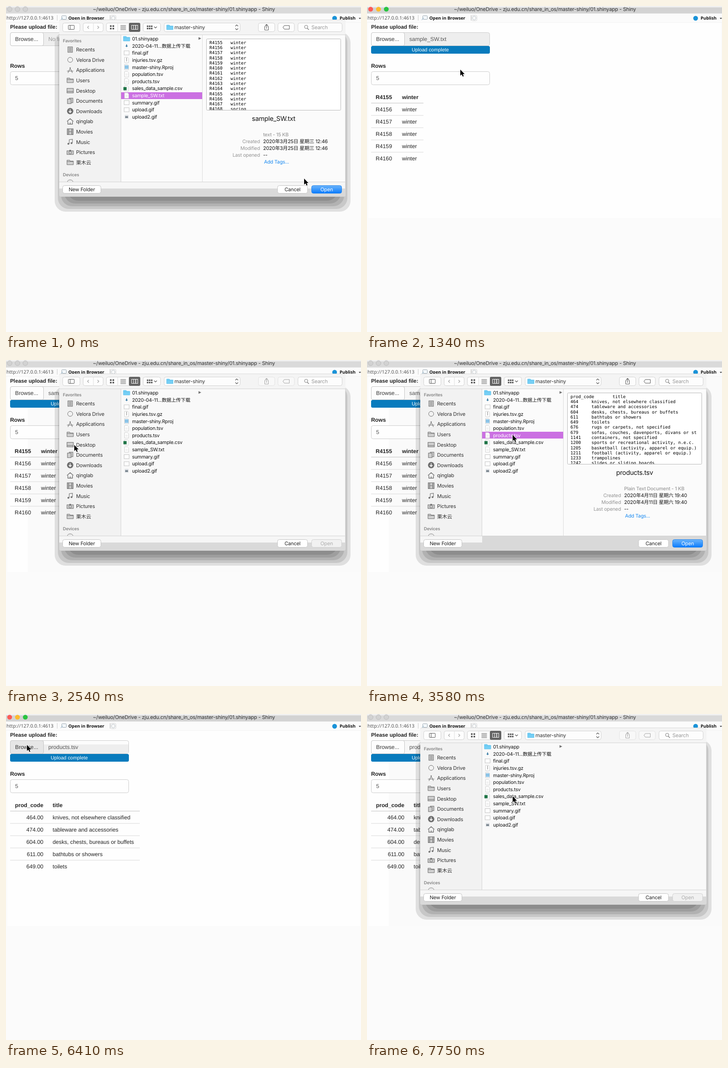
Animation, 780 px wide and 718 px high, one loop 8 s. Source, as an HTML page:

```html
<!DOCTYPE html>
<html lang="en">
<head>
<meta charset="utf-8">
<title>File upload</title>
<style>
html, body { margin: 0; width: 100%; height: 100%; overflow: hidden; background: #fbfbfb; }
svg { display: block; width: 780px; height: 718px; }
text { white-space: pre; text-rendering: geometricPrecision; }
.ui { font-family: Inter, "Noto Sans CJK SC", "Noto Sans CJK", sans-serif; letter-spacing: -.018em; }
.pg { font-family: "Liberation Sans", sans-serif; }
.tb { font-family: "Noto Sans", sans-serif; }
.mono { font-family: "DejaVu Sans Mono", monospace; }
.b { font-weight: 700; }
.sb { font-weight: 600; }
.md { font-weight: 500; }
.mid { text-anchor: middle; }
.end { text-anchor: end; }
</style>
</head>
<body>
<svg id="stage" viewBox="0 0 780 718"></svg>
<script>
const LOOP = 8000, TICK = 149;

const CLOSE_1 = 5, FILE_1 = 6, TABLE_1 = 7, HOVER_1 = 12, OPEN_2 = 16, PICK_2 = 24,
  CLOSE_2 = 33, FILE_2 = 34, TABLE_2 = 36, HOVER_2 = 41, OPEN_3 = 44;

// Pointer key points: tick, x, y
const route = [[0, 655, 380], [2, 690, 404], [6, 690, 404], [9, 205, 140], [12, 46, 69], [15, 46, 69],
  [17, 150, 187], [21, 320, 165], [25, 320, 165], [30, 690, 410], [33, 690, 404], [35, 690, 404],
  [41, 46, 68], [43, 46, 68], [45, 150, 160], [49, 326, 172], [52, 320, 181], [54, 320, 181]];

const places = ['Recents', 'Velora Drive', 'Applications', 'Users', 'Desktop', 'Documents', 'Downloads',
  'qinglab', 'Movies', 'Music', 'Pictures', '栗木云'];
const files = ['01.shinyapp', '2020-04-11...数据上传下载', 'final.gif', 'injuries.tsv.gz', 'master-shiny.Rproj',
  'population.tsv', 'products.tsv', 'sales_data_sample.csv', 'sample_SW.txt', 'summary.gif', 'upload.gif', 'upload2.gif'];
const products = `464 knives, not elsewhere classified
474 tableware and accessories
604 desks, chests, bureaus or buffets
611 bathtubs or showers
649 toilets
676 rugs or carpets, not specified
679 sofas, couches, davenports, divans or st
1141 containers, not specified
1200 sports or recreational activity, n.e.c.
1205 basketball (activity, apparel or equip.)
1211 football (activity, apparel or equip.)
1233 trampolines
1242 slides or sliding boards`.split('\n').map(line => line.split(/ (.*)/));
const samples = Array.from({ length: 14 }, (_, i) => ['R' + (4155 + i), i < 13 ? 'winter' : 'spring']);

const repeat = (n, fn) => Array.from({ length: n }, (_, i) => fn(i)).join('');
// y is the middle of the capitals
const text = (x, y, size, cls, str, fill = '#222') =>
  `<text x="${x}" y="${y + size * .36}" font-size="${size}" class="${cls}" fill="${fill}">${str}</text>`;
const rect = (x, y, w, h, fill, rest = '') =>
  `<rect x="${x}" y="${y}" width="${w}" height="${h}" fill="${fill}" ${rest}/>`;
const box = (x, y, w, h, r, fill, stroke) =>
  rect(x + .5, y + .5, w - 1, h - 1, fill, `rx="${r}" stroke="${stroke}"`);
const path = (d, stroke, fill = 'none', w = 1, rest = '') =>
  `<path d="${d}" stroke="${stroke}" fill="${fill}" stroke-width="${w}" ${rest}/>`;
const dot = (x, y, r, fill, stroke = 'none') =>
  `<circle cx="${x}" cy="${y}" r="${r}" fill="${fill}" stroke="${stroke}"/>`;
const at = (x, y, s) => `<g transform="translate(${x} ${y})">${s}</g>`;
const folder = (fill, stroke) => path('M-7-5H-1L0-3H7V5H-7ZM-7-2H7', stroke, fill);
const blueFolder = folder('#76cff5', '#5fc3ee');

function chrome(active) {
  const lights = active ? ['#fc5b57', '#fdbc2e', '#29c440'] : Array(3).fill('#d2d2d2');
  return rect(0, 0, 780, 4, '#f0f0f0') + rect(0, 3, 780, 13.5, active ? '#d3d3d3' : '#dadada') +
    lights.map((c, i) => dot(8 + 17.2 * i, 7, 5.3, c, active ? 'none' : '#bdbdbd')).join('') +
    text(391, 7.3, 11.3, 'ui mid', '~/weiluo/OneDrive - zju.edu.cn/share_in_os/master-shiny/01.shinyapp - Shiny', '#333') +
    text(1, 26.5, 10.6, 'tb', 'http://127.0.0.1:4613', '#555') +
    path('M112.5 20V32M228.5 20V32', '#ccc') +
    box(122, 21, 11, 9, 1, '#f4f8fb', '#9aa7b0') + path('M120 31L125 26', '#7fa8c4') +
    text(137, 26.5, 9.55, 'tb sb', 'Open in Browser', '#111') +
    box(229, 20, 13, 13, 3, '#fafafa', '#d5d5d5') + dot(235.5, 26.5, 4, 'none', '#b5bec4') +
    dot(722, 27, 5.2, '#1a93d8') + text(733, 27, 9.5, 'tb sb', 'Publish', '#111') +
    path('M775 26H780L777.5 29Z', 'none', '#444') + rect(0, 36, 780, 1, '#f3f3f3');
}

function table(heads, rows, cols, width, numeric) {
  const row = (cells, y, cls) => cells.map((c, i) =>
    text(cols[i], y, 12.2, cls + (numeric && !i ? ' end' : ''), c)).join('');
  return row(heads, 200.5, 'pg b') + rect(9, 213, width, 1.5, '#d4d4d4') +
    rows.map((r, i) => row(r, 228 + 27 * i, 'pg')).join('') +
    repeat(4, i => rect(9, 240.5 + 27 * i, width, 1, '#d9d9d9'));
}

function page(n, open) {
  const file = n < FILE_1 ? '' : n < FILE_2 ? 'sample_SW.txt' : 'products.tsv';
  const hover = !open && (n >= HOVER_1 && n < OPEN_2 || n >= HOVER_2);
  const field = n < OPEN_2 ? '#eee' : open ? '#f7f7f7' : '#fcfcfc';
  let s = '';
  if (n >= CLOSE_1) s += rect(3, 37, 775, 430, '#fefefe') + (open ? rect(48, 37, 732, 430, '#fafafa') : '');
  s += text(9, 45.5, 11.8, 'pg b', 'Please upload file:') + box(9, 58, 261, 30, 4, field, '#ccc');
  if (n >= FILE_2 && !open) s += rect(83, 67, 186, 20, '#eee');
  s += box(9, 58, 74, 30, 3.5, hover ? '#e6e6e6' : '#fdfdfd', '#c4c4c4') +
    text(20, 73, 12.2, 'pg', 'Browse...', '#333') +
    text(93, 73, 12.2, 'pg', file || 'No file selected', file ? '#555' : '#999');
  if (file) s += rect(9, 88, 261, 17, '#087bbd', 'rx="3.5"') + text(139, 96.5, 10.9, 'pg mid', 'Upload complete', '#fff');
  s += text(9, 131.5, 12.2, 'pg b', 'Rows') + box(9, 144, 261, 30, 4, '#fefefe', '#ccc') + text(20, 159, 12.2, 'pg', '5', '#555');
  if (n >= TABLE_2) s += table(['prod_code', 'title'], products.slice(0, 5).map(([code, title]) => [code + '.00', title]), [82, 102.5], 285, true);
  else if (n >= TABLE_1) s += table(samples[0], samples.slice(1, 6), [19, 77], 115);
  return s;
}

function toolbar(enabled) {
  const ink = '#555';
  const button = (x, w, icon) => box(x, 37, w, 20, 4, '#fdfdfd', '#d2d2d2') + at(x + w / 2, 47, icon);
  const chevron = (x, y, turn) => `<path transform="translate(${x} ${y}) rotate(${turn})" d="M-3 1.5L0-1.5 3 1.5" stroke="${ink}" fill="none" stroke-width="1.2"/>`;
  return button(124, 39, box(-7, -5, 14, 10, 1, 'none', ink) + path('M-2.5-5V5', ink)) +
    button(169, 45, `<g opacity=".55">${chevron(-11, 0, -90) + chevron(11, 0, 90)}</g>` + path('M.5-10V10', '#ddd')) +
    button(220, 75, repeat(4, i => rect(-29 + i % 2 * 5.5, -4.5 + (i >> 1) * 5.5, 3.5, 3.5, ink)) +
      repeat(4, i => rect(-6, -4.5 + 3 * i, 12, 1, ink)) + path('M-12-10V10', '#ddd') +
      rect(12.5, -10, 25, 20, '#636363', 'rx="3"') + repeat(3, i => rect(18.5 + 4.5 * i, -4.5, 4.5, 9, 'none', 'stroke="#fff"'))) +
    button(301, 39, repeat(6, i => rect(-11 + i % 3 * 4.5, -4 + (i > 2) * 5, 3.3, 3.3, ink)) + chevron(8, 0, 180)) +
    button(347, 168, chevron(76, -4, 0) + chevron(76, 4, 180)) +
    at(360, 47, blueFolder) + text(370, 47.2, 11.3, 'ui', 'master-shiny', '#333') +
    `<g opacity="${enabled ? 1 : .5}">` +
    button(554, 37, path('M-2-2H-4V6H4V-2H2M0 3V-6', ink) + chevron(0, -5, 0)) +
    button(597, 37, path('M-7 0L-4-4H7V4H-4Z', ink)) + '</g>' +
    button(641, 98, '') + dot(659.5, 46, 3.6, 'none', '#777') + path('M662 49L665.5 52.5', '#777', 'none', 1.3) +
    text(671, 47.3, 11.2, 'ui', 'Search', '#999');
}

function placeIcon(name) {
  const ink = '#6f6f6f', pale = '#cfcfcf';
  const line = (d, w = 1.1) => path(d, ink, 'none', w);
  const plate = (w, h) => rect(-w / 2, -h / 2, w, h, pale, `stroke="${ink}" stroke-width="1.1"`);
  const icons = {
    Recents: () => plate(10, 12) + repeat(3, i => rect(-3, -3.5 + 3 * i, 6, 1, ink)),
    'Velora Drive': () => dot(0, 0, 5.5, 'none', ink),
    Applications: () => line('M-5 6L1-6M-1-6L5 6M-7 2H7'),
    Desktop: () => plate(14, 10) + line('M-7 2H7'),
    Documents: () => at(2, -1, plate(8, 10)) + at(-2, 1, plate(8, 10)),
    Downloads: () => dot(0, 0, 7, ink) + path('M0-4V3M-3 0L0 3 3 0', '#fff', 'none', 1.5),
    qinglab: () => line('M-7 0L0-6 7 0M-5 0V6H5V0M0 6V2', 1.4),
    Movies: () => plate(13, 13) + line('M-3-6V6M3-6V6M-3 0H3') + repeat(4, i => rect(-6, -4.5 + 3 * i, 3, 1, ink) + rect(3, -4.5 + 3 * i, 3, 1, ink)),
    Music: () => line('M-2 4V-5L5-6V2') + dot(-4, 4, 2, ink) + dot(3, 2.5, 2, ink),
    Pictures: () => at(0, 1, plate(14, 8) + dot(0, 0, 3, 'none', ink)) + rect(-2, -5, 4, 2, ink)
  };
  return icons[name] ? icons[name]() : folder(pale, ink);
}

function fileIcon(name) {
  const sheet = path('M-4.5-6H2L4.5-3.5V6H-4.5Z', '#d0d0d0', '#fff');
  const type = name.split('.').pop();
  if (type === 'shinyapp') return blueFolder;
  if (name.startsWith('2020')) return path('M-1-3H1V0H3L0 3-3 0H-1Z', 'none', '#3a7ca5');
  if (name === 'upload2.gif') return rect(-4, -4, 8, 8, '#d5d9dd') + rect(-3, -1, 6, 3, '#6b7782');
  if (type === 'gif') return box(-6, -5, 12, 10, 0, '#fefefe', '#c4c4c4');
  if (type === 'csv') return sheet + rect(-7, -3, 7, 7, '#1f7446');
  if (type === 'Rproj') return sheet + rect(-4, -4, 8, 8, '#8cc4e8');
  return sheet + (type === 'gz' ? path('M0-5V3', '#777') : repeat(2, i => rect(-2.5, -1 + 2.5 * i, 5, 1, '#ddd')));
}

function preview(name) {
  const isSample = name === 'sample_SW.txt';
  const lines = isSample ? samples : [['prod_code', 'title'], ...products];
  const date = isSample ? '2020年3月25日 星期三 12:46' : '2020年4月11日 星期六 19:40';
  const info = [['Created', date], ['Modified', date], ['Last opened', '--']];
  // columns stop at every eighth character
  const mono = (str, i, col) => text(447 + 46.2 * col, 80.3 + 11.28 * i, 9.6, 'mono', str, '#000');
  return rect(431, 64, 1, 323, '#dcdcdc') + box(440, 72, 296, 158, 2, '#fff', '#b8b8b8') +
    '<clipPath id="pane"><rect x="441" y="73" width="294" height="156"/></clipPath><g clip-path="url(#pane)">' +
    lines.map(([a, b], i) => mono(a, i, 0) + mono(b, i, a.length < 8 ? 1 : 2)).join('') + '</g>' +
    text(588, 247.5, 14.3, 'ui mid', name, '#111') +
    text(565, 283.3, 10.7, 'ui md', isSample ? 'text - 15 KB' : 'Plain Text Document - 1 KB', '#9a9a9a') +
    info.map(([k, v], i) => text(558, 298 + 15 * i, 10.7, 'ui end', k, '#949494') +
      text(565, 298 + 15 * i, 10.85, 'ui', v, '#111')).join('') +
    text(567, 343.3, 10.7, 'ui', 'Add Tags...', '#1688f0');
}

function dialog(n) {
  const picked = n < CLOSE_1 ? 'sample_SW.txt' : n >= PICK_2 && n < CLOSE_2 ? 'products.tsv' : '';
  let s = repeat(5, i => rect(107 + 7 * i, 57, 650 - 14 * i, 396 - 6 * i, '#000', 'opacity=".11" rx="24"'));
  s += rect(117, 30, 629, 390, '#d9d9d9', 'rx="4"') + rect(117, 31, 629, 33, '#f4f4f4', 'rx="4"') +
    rect(117, 64, 136, 323, '#f2f2f2') + rect(253, 64, 492, 323, picked ? '#fbfbfb' : '#f9f9f9') +
    rect(117, 388, picked === 'products.tsv' ? 136 : 628, 14, '#f6f6f6') +
    path('M117 63.5H745M117 387.5H745M252.5 64V387', '#d3d3d3') + toolbar(picked) +
    text(125, 76.5, 9.5, 'ui sb', 'Favorites', '#858585') + text(125, 372, 9.5, 'ui sb', 'Devices', '#858585') +
    path('M135 387A6 4 0 0 1 147 387', '#777');

  places.forEach((name, i) => {
    const y = 96 + 22.6 * i;
    s += at(141, y, placeIcon(name)) + text(154, y + .2, 11.2, 'ui', name, '#333');
  });
  files.forEach((name, i) => {
    const y = 72 + 15.65 * i, on = name === picked;
    if (on) s += rect(253, Math.round(y - 7.5), 178, 15, '#cb70e2');
    s += at(265, y, fileIcon(name)) + text(277, y + .1, 10.65, 'ui', name, on ? '#fff' : '#111');
  });
  s += path('M423 68.5L429 71.5 423 74.5Z', 'none', '#777');
  if (picked) s += preview(picked);

  const button = (x, w, label, fill = '#fff', stroke = '#c4c4c4', ink = '#222') =>
    box(x, 395, w, 18, 4, fill, stroke) + text(x + w / 2, 404, 11.1, 'ui mid', label, ink);
  return s + button(124, 85, 'New Folder') + button(596, 67, 'Cancel') +
    (picked ? button(671, 67, 'Open', 'url(#blue)', '#2083ee', '#fff') : button(671, 67, 'Open', '#f1f1f1', '#d0d0d0', '#adadad'));
}

function cursor(n) {
  const i = route.findIndex(k => k[0] > n);
  const [a, x0, y0] = route[i - 1], [b, x1, y1] = route[i];
  const f = (n - a) / (b - a);
  const hand = [CLOSE_1, FILE_1, CLOSE_2, FILE_2].includes(n);
  return at(x0 + (x1 - x0) * f, y0 + (y1 - y0) * f, hand
    ? path('M-4 6Q-3 4-1 6L2 13 0 12-5 8Q-5 6-4 9L0 18H7V14L6 9-1 10-2 6Z', 'none', '#fff') +
      path('M-1 13L-4 6Q-3 3-1 6L0 9Q3 7 7 10L7 15 6 19H0L-5 13Q-6 11-4 11Z', '#111', '#fff', 1.1)
    : path('M0 0V13.5L3 10.5 5.5 15.5 7.5 14.5 5.5 10H9.5Z', '#fff', '#000', 1.4, 'paint-order="stroke"'));
}

const defs = '<defs><linearGradient id="blue" x2="0" y2="1"><stop stop-color="#6cb5fb"/><stop offset="1" stop-color="#0a7bfd"/></linearGradient></defs>';
const stage = document.getElementById('stage');
let shown;

function frame() {
  // frames are due up to 10 ms ahead of the even beat
  const n = Math.floor((performance.now() % LOOP + 10) / TICK);
  if (n !== shown) {
    shown = n;
    const open = n < CLOSE_1 || n >= OPEN_2 && n < CLOSE_2 || n >= OPEN_3;
    stage.innerHTML = defs + rect(0, 0, 780, 718, '#fbfbfb') + page(n, open) + chrome(!open) + (open ? dialog(n) : '') + cursor(n);
  }
  requestAnimationFrame(frame);
}
frame();
</script>
</body>
</html>
```
